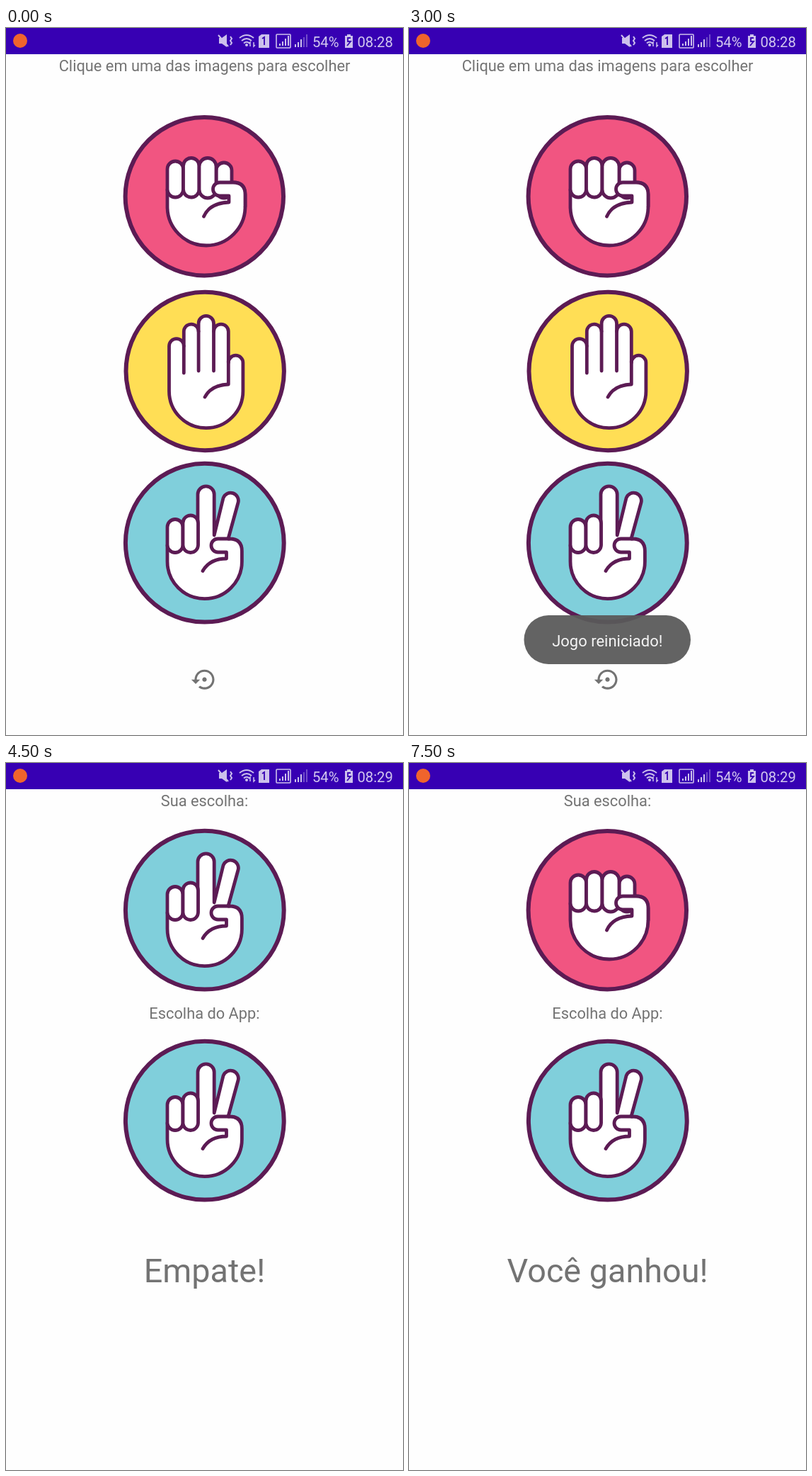
An HTML page for the animation above (8 s loop, 561x998 px).

```html
<!DOCTYPE html>
<html lang="pt-BR">
<head>
<meta charset="utf-8">
<title>Pedra, papel e tesoura</title>
<style>
  html, body { margin: 0; width: 100%; height: 100%; overflow: hidden; background: #fefefe; }
  svg { display: block; width: 561px; height: 998px; }
  text { font: 21.82px Roboto, sans-serif; fill: #737373; text-anchor: middle; }
  .result { font-size: 46.75px; }
  .status text { font-size: 20.2px; fill: #d3c8ef; text-anchor: start; }
  .hand { fill: #fff; stroke: #5c1b54; stroke-width: 4.8; stroke-linecap: round; stroke-linejoin: round; }
  .disc { stroke-width: 6; }
  .line { fill: none; }
  .toast text { font-size: 22px; fill: #f4f4f4; }
</style>
</head>
<body>
<svg viewBox="0 0 561 998">
  <defs>
    <g id="rock" class="hand">
      <circle class="disc" cx="280.3" cy="237.7" r="111.7" fill="#f15581"/>
      <path d="M228 228V252a55 55 0 0 0 110 0V235Q338 218 321 218L319 228Z"/>
      <rect x="297" y="190" width="22" height="50" rx="11"/>
      <rect x="228" y="188" width="22.5" height="51" rx="11.2"/>
      <rect x="250.5" y="183.500" width="22.500" height="55.5" rx="11.2"/>
      <rect x="273" y="183.500" width="24" height="56.500" rx="12"/>
      <path stroke="none" d="M303 218H321Q338 218 338 235V252H306L315 246V237H303a9.500 9.500 0 0 1 0-19"/>
      <path class="line" d="M338 252V235Q338 218 321 218H302a9.500 9.500 0 0 0 0 19H315V246Q288 247 279.500 266"/>
    </g>
    <g id="paper" class="hand">
      <circle class="disc" cx="281.200" cy="484.500" r="111.700" fill="#ffde55"/>
      <path d="M230.500 512V449a10.400 10.400 0 0 1 20.800 0V428.500a10.400 10.400 0 0 1 20.800 0V417a10.700 10.700 0 0 1 21.400 0V428.500a10.400 10.400 0 0 1 20.800 0V472.500a10.300 10.300 0 0 1 20.600 0V512.500a52.200 52.200 0 0 1-104.400 0Z"/>
      <path class="line" d="M251.300 449V487M272.100 428V484M293.500 428V484M314.300 470V503Q290 504 281 521"/>
    </g>
    <g id="scissors" class="hand">
      <circle class="disc" cx="280.800" cy="726.700" r="111.900" fill="#80cfdb"/>
      <path d="M228 730V753a52.700 52.700 0 0 0 105.400 0V738.500Q333.400 721 316 721H314L328 670a11 11 0 0 0-21-6.500L294.200 716V658.500a11.600 11.600 0 0 0-23.200 0V730"/>
      <rect x="228" y="693.500" width="22" height="47" rx="11"/>
      <rect x="250" y="688" width="21.500" height="52.500" rx="10.750"/>
      <path class="line" d="M316 721H299.500a9.500 9.500 0 0 0 0 19H311.500V749Q288 749 278 766.500"/>
    </g>
  </defs>

  <g class="status">
    <path fill="#3700b3" d="M0 0H561V37H0Z"/>
    <circle cx="20" cy="18" r="10" fill="#f0642c"/>
    <g fill="#cdc1ec">
      <path d="M301 14H305L312 9V27L305 22H301Z"/>
      <path d="M357 12L361 9H372V28H357Z"/>
      <path d="M479 11H482V9H487V11H490V28H479Z"/>
      <path d="M386 25V22H388V25ZM390 25V19H392V25ZM394 25V15H396V25ZM398 25V11H400V25Z"/>
      <path d="M408 27V23H410V27ZM412 27V20H414V27ZM416 27V16H418V27Z"/>
      <path opacity=".4" d="M420 27V13H422V27ZM424 27V9H426V27Z"/>
    </g>
    <g fill="none" stroke="#cdc1ec" stroke-width="2">
      <path d="M300 10L314 26M317 12l2 3-2 3 2 3-2 3"/>
      <path d="M330 14Q340 6 350 14M333 18Q340 12 347 18M336 21.500Q340 18 344 21.500"/>
      <path stroke-width="1.500" d="M345 26V20l-2 2M350 20V26l2-2"/>
      <rect x="382" y="9" width="20" height="19" rx="1" stroke-width="1.600"/>
    </g>
    <circle cx="340" cy="24" r="2" fill="#cdc1ec"/>
    <path fill="none" stroke="#3700b3" stroke-width="1.800" d="M362 15l3-2V24M487 14H483V19H487L482 25"/>
    <text x="433" y="26.500">54%</text>
    <text x="496.500" y="26.500" id="clock">08:28</text>
  </g>

  <g id="menu">
    <text x="280.500" y="60.500">Clique em uma das imagens para escolher</text>
    <use href="#rock"/>
    <use href="#paper"/>
    <use href="#scissors"/>
    <path fill="#737373" transform="translate(261.800 901) scale(1.558)" d="M14 12c0-1.100-.9-2-2-2s-2 .9-2 2 .9 2 2 2 2-.9 2-2zm-2-9c-4.970 0-9 4.030-9 9H0l4 4 4-4H5c0-3.870 3.130-7 7-7s7 3.130 7 7-3.130 7-7 7c-1.510 0-2.910-.49-4.060-1.300l-1.420 1.440C8.040 20.300 9.940 21 12 21c4.970 0 9-4.030 9-9s-4.030-9-9-9z"/>
    <g class="toast" id="toast">
      <rect x="162.500" y="829" width="235.500" height="69" rx="34.500" fill="#5a5a5a" fill-opacity=".94"/>
      <text x="280.300" y="873">Jogo reiniciado!</text>
    </g>
  </g>

  <g id="round">
    <text x="280.500" y="60.500">Sua escolha:</text>
    <use id="choice"/>
    <text x="280.500" y="360.500">Escolha do App:</text>
    <use href="#scissors" y="-222"/>
    <text class="result" id="result" x="280.500" y="733"></text>
  </g>
</svg>
<script>
  const LOOP = 8000, STEP = 1500;
  const lift = { rock: -30, paper: -277, scissors: -519 };
  const scenes = [
    { clock: '08:28' },
    { clock: '08:28', choice: 'paper', result: 'Você perdeu!' },
    { clock: '08:28', toast: true },
    { clock: '08:29', choice: 'scissors', result: 'Empate!' },
    { clock: '08:28', toast: true },
    { clock: '08:29', choice: 'rock', result: 'Você ganhou!' }
  ];
  const $ = id => document.getElementById(id);
  const show = (id, on) => { $(id).style.display = on ? '' : 'none'; };
  let current;

  function render(scene) {
    const { clock, choice, result, toast } = scene;
    $('clock').textContent = clock;
    show('menu', !choice);
    show('toast', toast);
    show('round', choice);
    if (!choice) return;
    $('choice').setAttribute('href', '#' + choice);
    $('choice').setAttribute('y', lift[choice]);
    $('result').textContent = result;
  }

  function tick() {
    const scene = scenes[Math.floor(performance.now() % LOOP / STEP)];
    if (scene !== current) render(current = scene);
    requestAnimationFrame(tick);
  }
  tick();
</script>
</body>
</html>
```
